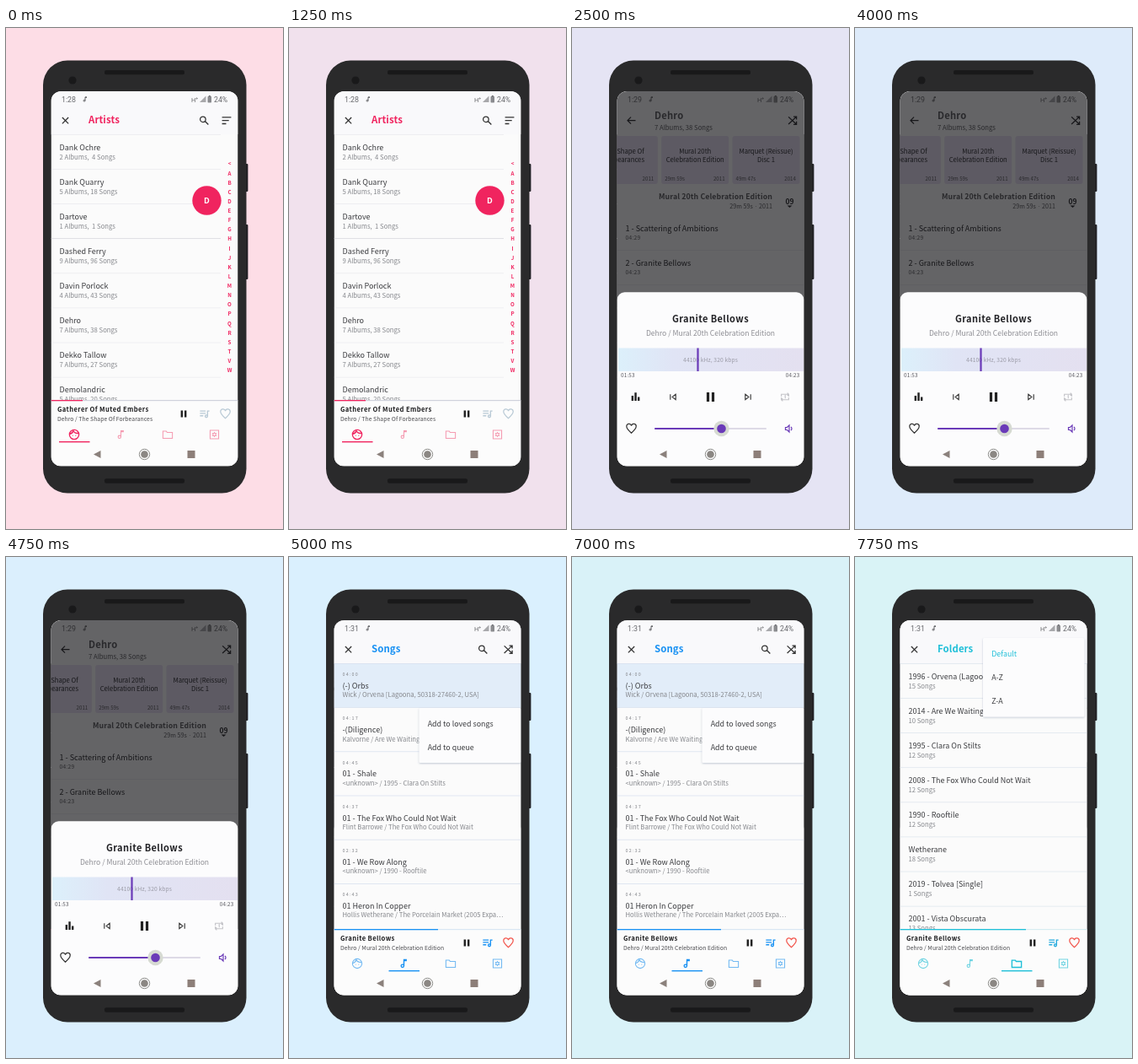
An HTML page that plays this animation: 329 px wide and 594 px high, repeating every 8000 ms.

```html
<!DOCTYPE html>
<html lang="en">
<head>
<meta charset="utf-8">
<title>Music player screens</title>
<style>
html, body { margin: 0; width: 100%; height: 100%; overflow: hidden; background: #fddde6; }
svg { display: block; width: 329px; height: 594px; }
text { font-family: "Noto Sans CJK JP", "Noto Sans CJK SC", "Noto Sans CJK", "Noto Sans", sans-serif; white-space: pre; }
.status { font-family: Roboto, sans-serif; }
</style>
</head>
<body>
<svg id="stage" viewBox="0 0 329 594">
  <defs>
    <clipPath id="screen"><rect x="53.5" y="75" width="222" height="444.5" rx="12"/></clipPath>
    <clipPath id="list"><rect x="53.5" y="126" width="222" height="315.5"/></clipPath>
    <linearGradient id="wave">
      <stop offset="0" stop-color="#dcf0fb"/>
      <stop offset=".3" stop-color="#e0e4f5"/>
      <stop offset="1" stop-color="#e4e0f0"/>
    </linearGradient>
    <filter id="shadow" x="-10%" y="-10%" width="120%" height="125%">
      <feDropShadow dx="0" dy="1" stdDeviation="1.2" flood-color="#56698c" flood-opacity=".35"/>
    </filter>
  </defs>
</svg>
<script>
const LOOP = 8000, FRAME = 250, HOLD = 2500;
const PINK = '#f0245f', PURPLE = '#6a3ab8', BLUE = '#1891f3', CYAN = '#1fbfd8';
const INK = '#3c3d40', SOFT = '#85878c', RULE = '#ebebef';

const rect = (x, y, w, h, fill, rx = 0, more = '') =>
  `<rect x="${x}" y="${y}" width="${w}" height="${h}" rx="${rx}" fill="${fill}" ${more}/>`;
const circle = (x, y, r, fill, more = '') =>
  `<circle cx="${x}" cy="${y}" r="${r}" fill="${fill}" ${more}/>`;

function text(str, x, y, size, fill, { weight = 400, anchor = 'start', gap = 0, cls = '' } = {}) {
  return `<text x="${x}" y="${y}" font-size="${size}" fill="${fill}" font-weight="${weight}" ` +
    `text-anchor="${anchor}" letter-spacing="${gap}" class="${cls}">${str.replace(/</g, '&lt;')}</text>`;
}

// Icons live on a 24-unit grid; a leading "*" marks a filled shape.
const ICONS = {
  close: 'M4 4L20 20M20 4L4 20',
  back: 'M22 12H3M11 4L3 12L11 20',
  search: 'M15 9.5a6 6 0 1 1-12 0a6 6 0 1 1 12 0M14 14L21 21',
  sort: 'M2 5H22M2 12H17M2 19H11',
  shuffle: 'M3 4L20 20M3 20L20 4M14 3.5H20.5V10M14 20.5H20.5V14',
  heart: 'M12 20.3C5 14 3 11.5 3 8.5a4.5 4.5 0 0 1 9-1.9a4.5 4.5 0 0 1 9 1.9c0 3-2 5.5-9 11.8z',
  queue: 'M2 6H14M2 11H14M2 16H9M22 6H18V17M18 17a2.5 2.5 0 1 1-5 0a2.5 2.5 0 1 1 5 0',
  note: 'M18 4H12V17M12 17a3 3 0 1 1-6 0a3 3 0 1 1 6 0M12 6H18',
  face: 'M22 12a10 10 0 1 1-20 0a10 10 0 1 1 20 0M3 11C7 10 9 8 10 4C12 8 16 10 21 9M9 13.5v1M15 13.5v1',
  folder: 'M2 5H9L11 7.5H22V20H2z',
  gear: 'M3 3H21V21H3zM15 12a3 3 0 1 1-6 0a3 3 0 1 1 6 0M12 6.5V9M12 15v2.5M7.2 9.2L9.4 10.5M14.6 13.5L16.8 14.8M7.2 14.8L9.4 13.5M14.6 10.5L16.8 9.2',
  bars: '*M3 10H7.5V21H3zM9.8 3H14.3V21H9.8zM16.6 13H21V21H16.6z',
  prev: 'M5 5V19M19 5L10 12L19 19z',
  next: 'M19 5V19M5 5L14 12L5 19z',
  repeat: 'M4 11V6H20V11M17 3L20 6L17 9M20 13V18H4V13M7 15L4 18L7 21M11 10L12.5 9V15',
  volume: 'M3 9H7L12 4V20L7 15H3zM16 8a5 5 0 0 1 0 8'
};

function icon(name, x, y, size, color, width = 2.4) {
  const solid = ICONS[name][0] === '*';
  const d = ICONS[name].replace('*', '');
  const paint = solid ? `fill="${color}"` : `fill="none" stroke="${color}" stroke-width="${width}"`;
  return `<path d="${d}" ${paint} transform="translate(${x - size / 2} ${y - size / 2}) scale(${size / 24})"/>`;
}

function pause(x, y, w, h, gap, color = '#222') {
  return rect(x - gap / 2 - w, y - h / 2, w, h, color) + rect(x + gap / 2, y - h / 2, w, h, color);
}

function statusBar(time, color) {
  const opt = { cls: 'status' };
  return text(time, 66, 88, 8.8, color, opt) +
    icon('note', 94, 84.5, 8, color, 3) +
    text('H⁺', 220, 87.5, 7.5, color, opt) +
    `<path d="M230 88L237.5 80.5V88z" fill="${color}" opacity=".55"/>` +
    rect(239.5, 81, 4.5, 7.5, color, .7, 'opacity=".75"') + rect(240.8, 80, 2, 1.2, color) +
    text('24%', 247, 88, 8.7, color, opt);
}

const navBar = () =>
  '<path d="M112.5 501V510L104 505.5z" fill="#8b817c"/>' +
  circle(164.5, 505.5, 6.2, 'none', 'stroke="#8b8b88"') + circle(164.5, 505.5, 4.3, '#8b8783') +
  rect(215.5, 501, 9, 9, '#8d7f79');

const header = (title, accent, time, icons) =>
  rect(53.5, 75, 222, 444.5, '#fbfbfb') + rect(53.5, 75, 222, 51, '#f9f9fb') +
  statusBar(time, '#66676b') +
  icon('close', 70.5, 109.7, 11, '#333', 2.8) +
  text(title, 98, 113, 11.4, accent, { weight: 700, gap: .1 }) +
  icons.map(([name, x]) => icon(name, x, 109.7, 13, '#333')).join('');

function footer(o) {
  const tabs = ['face', 'note', 'folder', 'gear'].map((name, i) => {
    const x = 81 + 55.5 * i, on = i === o.tab;
    return icon(name, x, 482, 13.5, on ? o.accent : o.pale, on ? 2.4 : 1.9) +
      (on ? rect(x - 18, 490, 36.5, 1.4, o.accent) : '');
  });
  return rect(53.5, 441.5, 222, 78, '#fcfcfc') +
    rect(53.5, 441, 222, 1.2, o.track) + rect(53.5, 441, o.done - 53.5, 1.3, o.accent) +
    text(o.song, 61, 455, 7.6, '#1b1b1d', { weight: 700, gap: .4 }) +
    text(o.album, 61, 465.5, 6.8, '#4a4a4e', { weight: 500, gap: .05 }) +
    pause(211, 457.5, 2.4, 8, 2) +
    icon('queue', 236, 457.5, 13.5, o.queue) + icon('heart', 260.5, 457.5, 15, o.heart, 2) +
    tabs.join('') + navBar();
}

// Two-line rows shared by the artist and folder lists.
function rows(items, right, rule) {
  return '<g clip-path="url(#list)">' + items.map(([main, sub], i) => {
    const y = 126 + 41.1 * i;
    return rect(53.5, y, right - 53.5, .8, rule) +
      text(main, 63.5, y + 18.7, 9, INK) + text(sub, 63.5, y + 29.6, 7.7, SOFT);
  }).join('') + '</g>';
}

function artists() {
  const count = (a, s) => `${a} Albums, ${String(s).padStart(2)} Songs`;
  const items = [
    ['Dank Ochre', count(2, 4)], ['Dank Quarry', count(5, 18)], ['Dartove', count(1, 1)],
    ['Dashed Ferry', count(9, 96)], ['Davin Porlock', count(4, 43)], ['Dehro', count(7, 38)],
    ['Dekko Tallow', count(7, 27)], ['Demolandric', count(5, 20)]
  ];
  const index = [...'<ABCDEFGHIJKLMNOPQRSTVW'].map((c, i) =>
    text(c, 265.5, 163.4 + 11.13 * i, 6.2, PINK, { weight: 700, anchor: 'middle' }));
  return header('Artists', PINK, '1:28', [['search', 235.5], ['sort', 262]]) +
    rows(items, 255, RULE) + rect(53.5, 249.2, 201.5, .8, '#dcdce2') + index.join('') +
    circle(238.5, 204.5, 17.2, PINK) +
    text('D', 238.5, 207.9, 9.5, '#fff', { weight: 700, anchor: 'middle' }) +
    footer({ accent: PINK, pale: '#f59cb2', tab: 0, done: 91, track: '#cfd2dc',
      song: 'Gatherer Of Muted Embers', album: 'Dehro / The Shape Of Forbearances',
      queue: '#b9cad6', heart: '#b9cad6' });
}

function player() {
  const dark = '#17171a', dim = '#29292c';
  const card = (x, a, b, length, year) =>
    rect(x, 128, 80, 57, '#5d5a63', 3) +
    text(a, x + 40, 149, 7.7, dark, { weight: 500, anchor: 'middle' }) +
    text(b, x + 40, 159, 7.7, dark, { weight: 500, anchor: 'middle' }) +
    text(length, x + 4, 180.5, 6.2, dim) +
    text(year, x + 75.5, 180.5, 6.2, dim, { anchor: 'end' });
  const track = (name, time, y) => text(name, 63.5, y, 9, dark) + text(time, 63.5, y + 10, 6.6, dim, { gap: .3 });
  return rect(53.5, 75, 222, 444.5, '#646466') + statusBar('1:29', '#303033') +
    icon('back', 70.5, 109.7, 12, dark) + icon('shuffle', 262, 109.7, 13, dark) +
    text('Dehro', 98, 107.5, 11.2, dim, { weight: 700, gap: .2 }) +
    text('7 Albums, 38 Songs', 98, 121, 7.7, dim) +
    card(21.8, 'The Shape Of', 'Forbearances', '56m 46s', '2011') +
    card(106.2, 'Mural 20th', 'Celebration Edition', '29m 59s', '2011') +
    card(190.5, 'Marquet (Reissue)', 'Disc 1', '49m 47s', '2014') +
    text('Mural 20th Celebration Edition', 238, 203, 8.8, dim, { weight: 700, anchor: 'end', gap: .1 }) +
    text('29m 59s · 2011', 238, 214, 7.2, dim, { anchor: 'end' }) +
    text('09', 258.5, 209, 8.5, dark, { weight: 700, anchor: 'middle' }) +
    `<path d="M255.5 210.5H261.5L258.5 213z" fill="${dark}"/>` +
    track('1 - Scattering of Ambitions', '04:29', 241) +
    rect(53.5, 263, 222, .7, '#5e5e61') +
    track('2 - Granite Bellows', '04:23', 282) +
    rect(53.5, 304, 222, .7, '#5e5e61') +
    rect(53.5, 313.3, 222, 206.2, '#fcfcfd', 9) +
    text('Granite Bellows', 164.5, 348.5, 11, '#232327', { weight: 700, anchor: 'middle', gap: .4 }) +
    text('Dehro / Mural 20th Celebration Edition', 164.5, 364.8, 8.6, '#8d8d93', { weight: 500, anchor: 'middle' }) +
    rect(55, 379.5, 220, 27.5, 'url(#wave)') +
    text('44100 kHz, 320 kbps', 164.5, 395.7, 6.7, '#9a9aa6', { anchor: 'middle', gap: .1 }) +
    rect(148.4, 379.5, 2.2, 27.5, PURPLE) +
    text('01:53', 58, 414, 6.3, '#55555c', { weight: 500, gap: .2 }) +
    text('04:23', 270.5, 414, 6.3, '#55555c', { weight: 500, anchor: 'end', gap: .2 }) +
    icon('bars', 75.5, 437, 13, '#222') + icon('prev', 120, 437.5, 11, '#333') +
    pause(164.5, 437.5, 3.2, 11, 2.8) + icon('next', 209, 437.5, 11, '#333') +
    icon('repeat', 253, 437.5, 13, '#c3c3c8', 2) +
    icon('heart', 70.5, 475, 15, '#333', 2) +
    rect(98, 474.2, 133, 1.5, '#d3cfe0', .7) + rect(98, 474, 80, 1.9, PURPLE, .9) +
    circle(177.5, 475, 9.2, '#d6dad2') + circle(177.5, 475, 5.3, PURPLE) +
    icon('volume', 258, 475, 12, PURPLE) + navBar();
}

function menu(x, y, w, h, items, accent) {
  return rect(x, y, w, h, '#fcfcfd', 1.5, 'filter="url(#shadow)"') +
    items.map((s, i) => text(s, x + 10.2, y + 21.5 + 28 * i, 8.9, !i && accent || INK)).join('');
}

function songs() {
  const items = [
    ['04:00', '(-) Orbs', 'Wick / Orvena [Lagoona, 50318-27460-2, USA]'],
    ['04:17', '-(Diligence)', 'Kalvorne / Are We Waiting'],
    ['04:45', '01 - Shale', '<unknown> / 1995 - Clara On Stilts'],
    ['04:37', '01 - The Fox Who Could Not Wait', 'Flint Barrowe / The Fox Who Could Not Wait'],
    ['02:32', '01 - We Row Along', '<unknown> / 1990 - Rooftile'],
    ['04:43', '01 Heron In Copper', 'Hollis Wetherane / The Porcelain Market (2005 Expa…']
  ];
  const list = items.map(([time, name, by], i) => {
    const y = 126 + 52.2 * i;
    return rect(53.5, y, 222, .8, '#d9e2ef') +
      text(time, 63.5, y + 15.2, 5.4, '#85878c', { weight: 500, gap: 1.2 }) +
      text(name, 63.5, y + 30, 9, INK) + text(by, 63.5, y + 40.4, 7.7, SOFT);
  });
  return header('Songs', BLUE, '1:31', [['search', 230.5], ['shuffle', 260.5]]) +
    rect(53.5, 126, 222, 52.2, '#e2edf9') + list.join('') +
    menu(154.5, 179, 121, 65, ['Add to loved songs', 'Add to queue']) +
    footer({ accent: BLUE, pale: '#72b9f2', tab: 1, done: 177, track: '#d8e6f3',
      song: 'Granite Bellows', album: 'Dehro / Mural 20th Celebration Edition',
      queue: BLUE, heart: '#f2554c' });
}

function folders() {
  const items = [
    ['1996 - Orvena (Lagoona, USA)', '15 Songs'], ['2014 - Are We Waiting', '10 Songs'],
    ['1995 - Clara On Stilts', '12 Songs'], ['2008 - The Fox Who Could Not Wait', '12 Songs'],
    ['1990 - Rooftile', '12 Songs'], ['Wetherane', '18 Songs'],
    ['2019 - Tolvea [Single]', '1 Songs'], ['2001 - Vista Obscurata', '13 Songs']
  ];
  return header('Folders', CYAN, '1:31', []) + rows(items, 275.5, '#dfe6ee') +
    menu(152, 96, 120.5, 93.5, ['Default', 'A-Z', 'Z-A'], CYAN) +
    footer({ accent: CYAN, pale: '#70d4e2', tab: 2, done: 203, track: '#d6ecf1',
      song: 'Granite Bellows', album: 'Dehro / Mural 20th Celebration Edition',
      queue: '#22a9dd', heart: '#f2554c' });
}

const phone =
  rect(284, 161, 3.4, 33, '#1f1f23', 1) + rect(284, 233, 3.4, 65, '#1f1f23', 1) +
  rect(44, 38.5, 241.5, 513, '#2a2a2b', 29) +
  rect(117, 50, 95, 5.2, '#19191a', 2) + rect(117, 534.3, 95, 5.5, '#19191a', 2) +
  circle(79, 62, 4.6, '#19191a');

// Each screen holds for the same time while the backdrop drifts to the next tint.
const SCENES = [[artists, '#fddde6'], [player, '#e5e4f4'], [songs, '#daf0fe'], [folders, '#d9f3f6']];
const startOf = i => i * HOLD / LOOP;

const stage = document.getElementById('stage');
stage.insertAdjacentHTML('beforeend', phone + '<g clip-path="url(#screen)">' +
  SCENES.map(([draw]) => `<g class="scene">${draw()}</g>`).join('') + '</g>');

const timing = { duration: LOOP, iterations: Infinity, easing: `steps(${LOOP / FRAME})` };
const tints = SCENES.map(([, backgroundColor], i) => ({ backgroundColor, offset: startOf(i) }));
const anims = [document.body.animate(
  [...tints, { backgroundColor: SCENES.at(-1)[1], offset: 1 }], timing)];

// Screens are opaque, so a later one only has to appear over the earlier ones.
stage.querySelectorAll('.scene').forEach((el, i) => {
  if (!i) return;
  const offset = startOf(i);
  anims.push(el.animate([
    { opacity: 0, offset: 0 }, { opacity: 0, offset }, { opacity: 1, offset }, { opacity: 1, offset: 1 }
  ], timing));
});
anims.forEach(a => { a.startTime = document.timeline.currentTime; });
</script>
</body>
</html>
```
